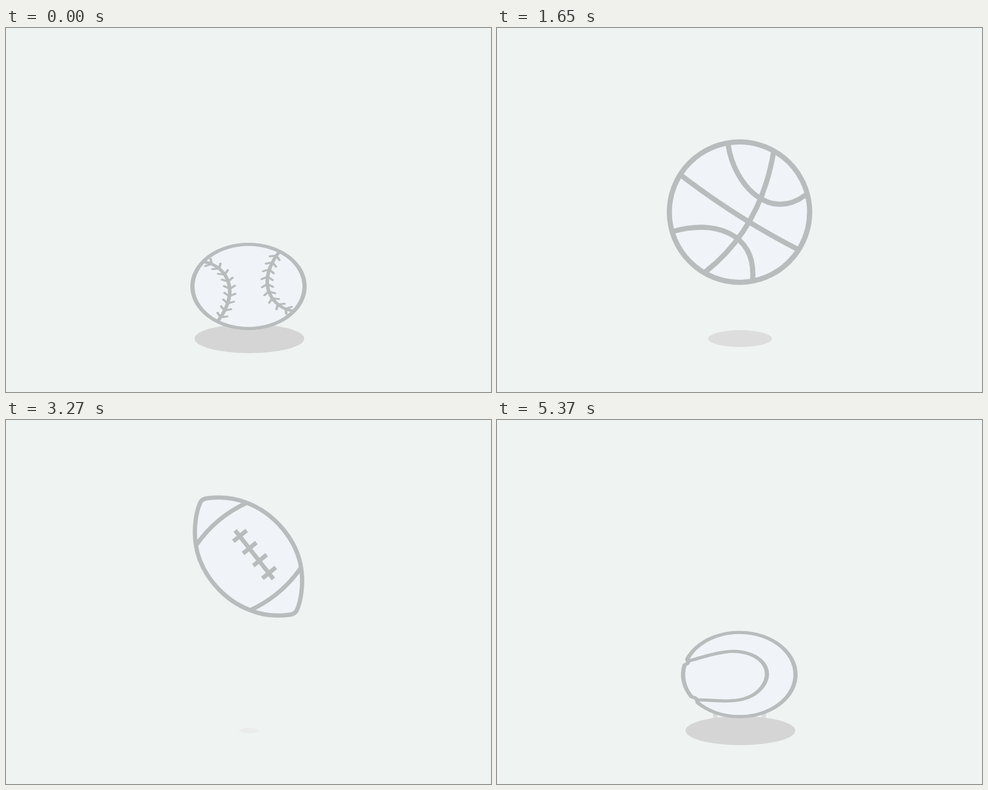
An HTML page that plays this animation: 800x600 px, repeating every 5400 ms.

```html
<!DOCTYPE html>
<html lang="en">
<head>
<meta charset="utf-8">
<title>Bouncing balls</title>
<style>
  html, body { margin: 0; width: 100%; height: 100%; overflow: hidden; background: #eff3f2; }
  svg { display: block; width: 800px; height: 600px; }
  .ball { fill: none; stroke: #b9bcbc; stroke-width: 7; stroke-linejoin: round; }
  .skin { fill: #f0f4f8; }
  .thick { stroke-width: 8.5; }
  .round { stroke-linecap: round; }
</style>
</head>
<body>
<svg viewBox="0 0 800 600">
  <g id="trails" fill="#dadcdb"></g>
  <ellipse id="shadow" cx="401.5" cy="512" fill="#d5d5d5"/>
  <g id="balls"></g>
</svg>
<script>
const BOUNCE = 900, STEP = 30;
const NS = 'http://www.w3.org/2000/svg';
const byId = id => document.getElementById(id);

function add(parent, tag, attrs) {
  const el = document.createElementNS(NS, tag);
  for (const key in attrs) el.setAttribute(key, attrs[key]);
  return parent.appendChild(el);
}
const stroke = (g, d, attrs = {}) => add(g, 'path', { d, ...attrs });
const disc = (g, r, ry = r) => add(g, 'ellipse', { rx: r, ry, class: 'skin' });

function baseball(g) {
  disc(g, 92.5);
  for (const turn of [0, 180]) {
    const side = add(g, 'g', { transform: `rotate(${turn})`, class: 'round' });
    const seam = stroke(side, 'M-74-54C-40-48-10 5-50 75', { 'stroke-width': 6 });
    const length = seam.getTotalLength();
    let ticks = '';
    for (let i = 0; i < 9; i++) {
      const at = length * (0.09 + i * 0.107);
      const p = seam.getPointAtLength(at), q = seam.getPointAtLength(at + 1);
      const dir = Math.atan2(q.y - p.y, q.x - p.x);
      for (const bend of [-2.2, 2.2]) {
        const x = p.x + 11 * Math.cos(dir + bend), y = p.y + 11 * Math.sin(dir + bend);
        ticks += `M${p.x} ${p.y}L${x} ${y}`;
      }
    }
    stroke(side, ticks, { 'stroke-width': 4.2 });
  }
}

function basketball(g) {
  g.classList.add('thick');
  disc(g, 115.7);
  stroke(g, 'M71-90Q-8-7-71 89M-92-66Q-30 32 92 66');
  stroke(g, 'M-20-111C-8-45-36 24-112 10M112-7C45-4-22 48 17 112');
}

function cricketBall(g) {
  disc(g, 92.5);
  const rows = [
    { from: [-39, -70], mid: [36.5, -28.5], to: [58, 47], turn: [1, 32], size: [13, 6.5] },
    { from: [-57, -55], mid: [11.5, -10.5], to: [36, 66], turn: [68, 103], size: [7, 14] }
  ];
  const mix = ([a, b], t) => a + (b - a) * t;
  let dashes = '';
  for (const row of rows) {
    for (let i = 0; i < 12; i++) {
      const t = i / 11, u = 1 - t;
      const [x, y] = [0, 1].map(k => u * u * row.from[k] + 2 * u * t * row.mid[k] + t * t * row.to[k]);
      const a = mix(row.turn, t) * Math.PI / 180, half = mix(row.size, t) / 2;
      const dx = half * Math.cos(a), dy = half * Math.sin(a);
      dashes += `M${x - dx} ${y - dy}L${x + dx} ${y + dy}`;
    }
  }
  stroke(g, dashes, { class: 'round', 'stroke-width': 5 });
}

function football(g) {
  stroke(g, 'M-68-96C-46-99-24-97-4-89C42-72 80-28 87 20C91 48 86 74 80 88Q77 95 68 96' +
    'C46 99 24 97 4 89C-42 72-80 28-87-20C-91-48-86-74-80-88Q-77-95-68-96Z', { class: 'skin' });
  stroke(g, 'M-4-88Q-55-64-86-19M4 88Q55 64 86 19');
  const laces = [[-14, -34], [2, -14], [19, 6], [34, 27]];
  stroke(g, 'M-22-43L41 37' + laces.map(([x, y]) => `M${x - 11} ${y + 9}l22-18`).join(''));
}

function soccerBall(g) {
  g.classList.add('thick');
  disc(g, 115.7, 113.8);
  stroke(g, 'M-49-39Q-17-48 16-49Q37-22 46 8Q27 34 0 52Q-30 44-57 25Q-60-9-49-39Z');
  stroke(g, 'M-49-39L-72-63L-63-93M-72-63L-100-52' +
    'M16-49L31-81L5-112M31-81H84' +
    'M46 8L81 11L111-29M81 11L97 60' +
    'M0 52L7 86L-30 108M7 86L52 100' +
    'M-57 25L-88 39L-111 19M-88 39L-87 72');
}

function tennisBall(g) {
  stroke(g, 'M-14-91.5A92.5 92.5 0 1 1-88-29Q-79-34-82-44A92.5 92.5 0 0 1-27-89Q-20-83-14-91.5Z',
    { class: 'skin' });
  stroke(g, 'M-17-88C10-66 28-52 38-36C62 4 38 46-5 46C-52 46-64 4-83-33');
}

// turn: rotation at which each ball is drawn; dy: its own height offset
const kinds = [
  { draw: baseball, turn: 0, dy: 7 },
  { draw: basketball, turn: 36, dy: 0 },
  { draw: cricketBall, turn: 228, dy: 0 },
  { draw: football, turn: 228, dy: 0 },
  { draw: soccerBall, turn: 96, dy: -2 },
  { draw: tennisBall, turn: 48, dy: 0 }
];
for (const kind of kinds) {
  kind.el = add(byId('balls'), 'g', { class: 'ball' });
  kind.draw(kind.el);
}
const trails = [360, 400, 440].map(x => add(byId('trails'), 'rect', { x: x - 3.7, width: 7.4, rx: 1.5 }));

// Tables of [ms, value] within one bounce
const height = [[0, 419], [30, 366], [60, 319], [90, 284], [120, 262], [180, 235], [240, 221],
  [330, 213], [390, 213.5], [480, 219], [570, 225], [630, 238], [720, 282], [810, 355], [870, 419.5], [900, 419]];
const squash = [[0, 0.75], [30, 0.86], [60, 0.96], [90, 1], [810, 1], [840, 0.9], [870, 0.75], [900, 0.75]];
const spread = [[0, 181], [60, 148], [90, 134], [120, 122], [240, 75], [330, 32], [450, 4],
  [570, 32], [720, 92], [810, 132], [870, 181], [900, 181]];
const fade = [[0, 0], [32, 0.27], [75, 0.62], [122, 0.8], [134, 0.86], [181, 1]];
const trailY = [[0, 480], [60, 457], [90, 446], [120, 434.5], [240, 396], [840, 490], [870, 482], [900, 480]];
const trailSize = [[0, 16], [60, 21], [90, 19], [120, 15], [225, 0], [840, 0], [870, 20], [900, 16]];

function segment(table, x) {
  let i = 0;
  while (i < table.length - 2 && x >= table[i + 1][0]) i++;
  return i;
}
function linear(table, x) {
  const i = segment(table, x), [a, p] = table[i], [b, q] = table[i + 1];
  return p + (q - p) * (x - a) / (b - a);
}
function smooth(table, x) {
  const i = segment(table, x), [a, p] = table[i], [b, q] = table[i + 1];
  const slope = k => {
    const l = table[Math.max(k - 1, 0)], r = table[Math.min(k + 1, table.length - 1)];
    return (r[1] - l[1]) / (r[0] - l[0]) * (b - a);
  };
  const t = (x - a) / (b - a), u = 1 - t;
  return u * u * (1 + 2 * t) * p + t * t * (3 - 2 * t) * q + t * u * (u * slope(i) - t * slope(i + 1));
}

function render(ms) {
  const time = Math.floor(ms / STEP) * STEP % (BOUNCE * kinds.length);
  const current = Math.floor(time / BOUNCE), phase = time % BOUNCE;

  kinds.forEach(({ el, turn, dy }, i) => {
    el.style.display = i === current ? '' : 'none';
    if (i !== current) return;
    const angle = phase / BOUNCE * 360 - turn;
    el.setAttribute('transform',
      `translate(400 ${smooth(height, phase) + dy}) scale(1 ${linear(squash, phase)}) rotate(${angle})`);
  });

  const width = linear(spread, phase), shadow = byId('shadow');
  shadow.setAttribute('cx', 400 + width / 120);
  shadow.setAttribute('rx', width / 2);
  shadow.setAttribute('ry', width * 0.132);
  shadow.setAttribute('opacity', linear(fade, width));

  const size = Math.max(0, linear(trailSize, phase)), y = linear(trailY, phase);
  trails.forEach((rect, i) => {
    rect.setAttribute('y', y - size / 2 - (i === 1 ? 12 : 0));
    rect.setAttribute('height', size);
  });
}

const start = performance.now();
function tick() {
  render(performance.now() - start);
  requestAnimationFrame(tick);
}
tick();
</script>
</body>
</html>
```
